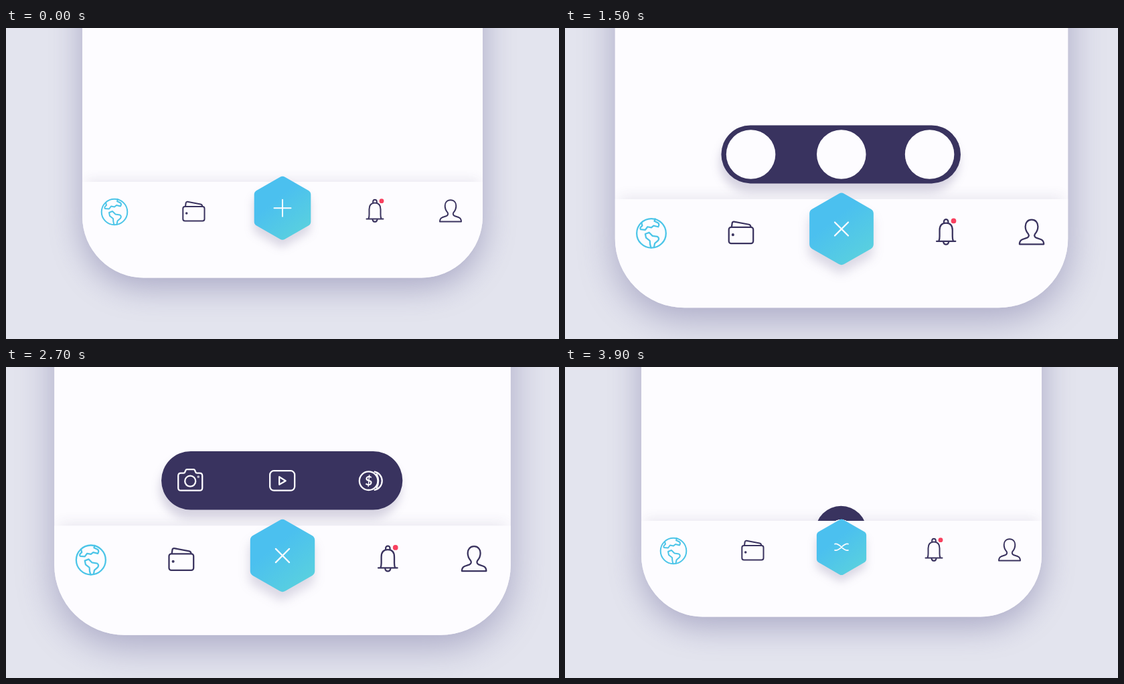
Animation of 826 by 465 pixels, one loop 4000 ms. Source, as an HTML page:

```html
<!DOCTYPE html>
<html lang="en">
<head>
<meta charset="utf-8">
<title>Tab bar menu</title>
<style>
  html, body { margin: 0; width: 100%; height: 100%; overflow: hidden; background: #e3e4ee; }
  svg { display: block; width: 826px; height: 465px; }
  .paper { fill: #fdfcff; }
  .shade { fill: #58548c; opacity: .42; filter: blur(25px); }
  .edge { fill: #3c3264; opacity: .1; filter: blur(9px); }
  .line { fill: none; stroke: #3a335f; stroke-width: 2; stroke-linecap: round; stroke-linejoin: round; }
  .globe { stroke: #4cc5e8; }
  .white { stroke: #fdfcff; stroke-width: 2.3; }
  .menu { filter: drop-shadow(-2px 11px 6px rgba(60, 52, 105, .2)); }
  .hex { filter: drop-shadow(-1px 11px 7px rgba(60, 52, 105, .18)); }
  .coin { font: 700 19px Lato, sans-serif; fill: #fdfcff; text-anchor: middle; }
</style>
</head>
<body>
<svg viewBox="0 0 826 465">
  <defs>
    <linearGradient id="sky" gradientUnits="userSpaceOnUse" x1="-25" y1="-30" x2="32" y2="40">
      <stop offset="0.25" stop-color="#4bc0ef"/>
      <stop offset="1" stop-color="#5ad1de"/>
    </linearGradient>
    <clipPath id="phone"><rect x="114" y="-400" width="598" height="773.5" rx="92"/></clipPath>
  </defs>
  <rect width="826" height="465" fill="#e3e4ee"/>
  <g id="camera">
    <rect class="shade" x="114" y="-386" width="598" height="773.5" rx="92"/>
    <rect class="paper" x="114" y="-400" width="598" height="773.5" rx="92"/>
    <g clip-path="url(#phone)">
      <rect class="edge" x="120" y="227" width="586" height="150"/>
    </g>

    <g id="menu">
      <g class="menu"><rect id="pill" y="-38.4" height="76.8" rx="38.4" fill="#39335f"/></g>
      <g id="tools" transform="scale(.877)">
        <g class="line white" transform="translate(-137 0)">
          <path d="M-14-11h4q1.500 0 2-1.500l1-2.500q.7-1.500 2-1.500h10q1.300 0 2 1.500l1 2.500q.5 1.500 2 1.500h4q4 0 4 4V11q0 4-4 4h-28q-4 0-4-4V-7q0-4 4-4z"/>
          <circle r="8" cy="1"/>
          <circle cx="12" cy="-5.500" r=".5"/>
        </g>
        <g class="line white">
          <rect x="-18" y="-14.500" width="37" height="29.500" rx="6"/>
          <path d="M-4-5.500L5.500.5L-4 6z"/>
        </g>
        <g transform="translate(129.500 .5)">
          <circle class="line white" r="13.800"/>
          <path class="line white" d="M9-13.600A13.900 13.900 0 0 1 9 13.600M12-10Q17 0 12 10"/>
          <text class="coin" y="6.500">$</text>
        </g>
      </g>
      <g class="paper">
        <circle class="disc"/><circle class="disc"/><circle class="disc"/>
      </g>
    </g>

    <g clip-path="url(#phone)"><rect class="paper" x="114" y="230" width="598" height="146"/></g>

    <g class="line globe" transform="translate(162 275)">
      <circle r="19.300"/>
      <path d="M-13-14l1 4q-4 3-2 5l6 .5 3-4 5 1 3-2.500 6 1.500q2-3 0-5l-5-2.500 1-3"/>
      <path d="M-8 1l5-2 4.500 4.500 6.500 1q3 2 1 5l-4.500 4-1 5M-8 1l1 5 5 4q0 5 1.500 9"/>
    </g>
    <g class="line">
      <rect x="264.300" y="267" width="32.200" height="21.500" rx="3"/>
      <path d="M268 266.500l.7-5q.5-2 2.500-1.700l19.500 3.600q2.300.5 2.500 3"/>
      <circle cx="269.700" cy="277" r=".8"/>
    </g>
    <g class="line" transform="translate(551 0)">
      <path d="M-12.500 285.500h25M-9.500 285q1-2 1-6v-8q0-9.500 8.500-9.500t8.500 9.500v8q0 4 1 6"/>
      <path d="M-2.800 261v-1.500a2.800 2.800 0 0 1 5.600 0v1.500M-3.500 286.500q.5 3.300 3.500 3.300t3.500-3.300"/>
      <circle cx="10" cy="258.700" r="3.400" fill="#f8405f" stroke="none"/>
    </g>
    <path class="line" transform="translate(664 0)"
      d="M0 257.200c-5.500 0-8.300 4-8.300 8.800 0 5 1.800 7.500 3.800 9.800 1.500 2.200.5 4.400-1.500 5.200l-6.500 2.300q-3.500 1.500-3.500 6.200H16q0-4.700-3.500-6.200L6 281c-2-.8-3-3-1.500-5.200 2-2.300 3.800-4.800 3.800-9.800 0-4.800-2.800-8.800-8.300-8.800z"/>

    <g id="button">
      <path class="hex" fill="url(#sky)" stroke="url(#sky)" stroke-width="14" stroke-linejoin="round"
        d="M0-40.500L35.300-20.200V20.200L0 40.500L-35.300 20.200V-20.200z"/>
      <path id="glyph" class="line white" style="stroke-width:2"/>
    </g>
  </g>
</svg>
<script>
const LOOP = 4000, REST = 76.8, OPEN = 316;
const $ = id => document.getElementById(id);
const discs = [...document.querySelectorAll('.disc')];
const smooth = u => u * u * (3 - 2 * u);

// Each track is a list of [time, value].
const zoom = [[0, 1], [500, 1.047], [1100, 1.115], [1900, 1.139], [2700, 1.14], [3100, 1.087], [3900, 1], [4000, 1]];
const drop = [[0, 230], [500, 246], [1100, 262], [1900, 247], [2700, 237.2], [3100, 235], [3900, 230], [4000, 230]];
const press = [[600, 1], [760, .85], [950, 1], [3720, 1], [3900, .877], [4000, .84]];
const morph = [[650, 0], [800, 1], [980, 2], [3700, 2], [3900, 1], [4000, .6]];
const rise = [[740, 40], [1080, -59.2], [3600, -59.2], [4030, 37]];
const width = [[1060, REST], [1500, OPEN], [3120, OPEN], [3580, REST]];
const disc = [[740, 10], [1100, 21.500], [1420, 32.500], [1500, 32.500], [1780, 0], [2820, 0], [3080, 32.500], [3250, 32.500], [3900, 18], [4000, 16]];

function segment(keys, t) {
  let i = 0;
  while (i < keys.length - 2 && t > keys[i + 1][0]) i++;
  const [a, b] = [keys[i], keys[i + 1]];
  return [i, Math.min(1, Math.max(0, (t - a[0]) / (b[0] - a[0])))];
}

function ease(keys, t) {
  const [i, u] = segment(keys, t);
  return keys[i][1] + (keys[i + 1][1] - keys[i][1]) * smooth(u);
}

// Monotone cubic: keeps speed continuous through the keys.
function glide(keys, t) {
  const slope = i => (keys[i + 1][1] - keys[i][1]) / (keys[i + 1][0] - keys[i][0]);
  const tangent = i => {
    if (i === 0 || i === keys.length - 1) return 0;
    const p = slope(i - 1), q = slope(i);
    return p * q > 0 ? 2 * p * q / (p + q) : 0;
  };
  const [i, u] = segment(keys, t);
  const [a, b] = [keys[i], keys[i + 1]], d = b[0] - a[0];
  return a[1] + (b[1] - a[1]) * smooth(u)
    + d * u * (1 - u) * ((1 - u) * tangent(i) - u * tangent(i + 1));
}

function stroke(angle, bend) {
  const r = angle * Math.PI / 180, c = Math.cos(r), s = Math.sin(r);
  const x = -12.500 * c, y = -12.500 * s;
  const cx = x / 2 + bend * s, cy = y / 2 - bend * c;
  return `M${x} ${y}C${cx} ${cy} ${-cx} ${-cy} ${-x} ${-y}`;
}

function draw(t) {
  $('camera').setAttribute('transform',
    `translate(413 ${glide(drop, t)}) scale(${glide(zoom, t)}) translate(-413 -230)`);

  const w = ease(width, t), spread = (w - REST) / (OPEN - REST);
  $('menu').setAttribute('transform', `translate(412.300 ${230 + ease(rise, t)})`);
  $('menu').style.display = t > 740 ? '' : 'none';
  $('pill').setAttribute('x', -w / 2);
  $('pill').setAttribute('width', w);
  $('tools').style.display = t > 1500 && t < 3080 ? '' : 'none';
  discs.forEach((el, i) => {
    el.setAttribute('cx', [-119, .5, 117][i] * spread);
    el.setAttribute('r', ease(disc, t));
  });

  $('button').setAttribute('transform', `translate(413 269.300) scale(${ease(press, t)})`);
  const m = ease(morph, t), k = Math.min(m, 1), j = Math.max(m - 1, 0);
  const bend = 6 * (1 - Math.abs(m - 1));
  $('glyph').setAttribute('d',
    stroke(25 * k + 20 * j, bend) + stroke(90 + 65 * k - 20 * j, -bend));
}

function tick(now) {
  draw(now % LOOP);
  requestAnimationFrame(tick);
}
draw(0);
requestAnimationFrame(tick);
</script>
</body>
</html>
```
